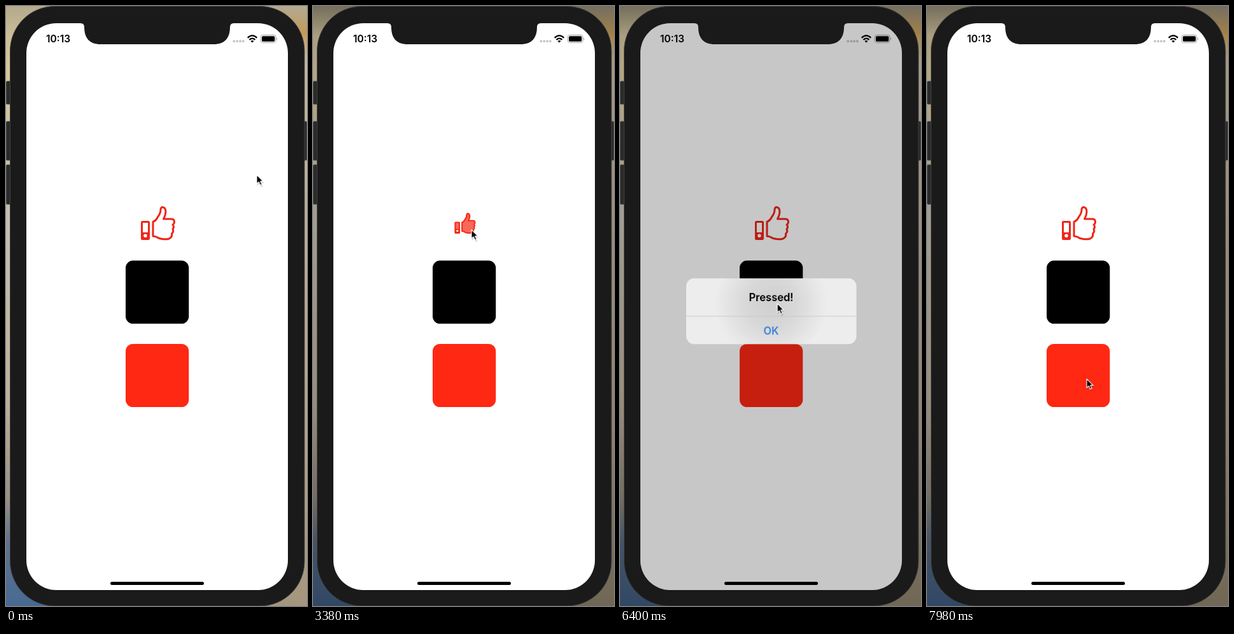
Recreate the animation shown at these times as an HTML page. Size 473 by 941 pixels, loop 8000 ms.

```html
<!DOCTYPE html>
<html lang="en">
<head>
<meta charset="utf-8">
<title>Like button</title>
<style>
html, body { margin: 0; width: 100%; height: 100%; overflow: hidden; background: #a79b87; }
svg { display: block; width: 473px; height: 941px; }
text { font-family: Inter, "Liberation Sans", sans-serif; font-weight: 600; }
.loop { animation: 8s linear infinite; }

.shade { animation-name: shade; animation-timing-function: step-end; }
@keyframes shade { 0% { opacity: .25; } 16.5%, 100% { opacity: 1; } }

.thumb { transform-origin: 239px 341px; animation-name: press; }
@keyframes press {
  0%, 17%, 23.5%, 27.59%, 34.1%, 40.5%, 47%, 52.84%, 59.34%, 100% { transform: scale(1); }
  19.25%, 29.84%, 42.75%, 55.09% { transform: scale(.5); }
  21.5%, 32.1%, 45%, 57.34% { transform: scale(1.05); }
}
.solid { animation-name: fill; }
@keyframes fill {
  0%, 17%, 31.5%, 40.5%, 56.8%, 100% { opacity: 0; }
  17.75%, 41.25% { opacity: .1; }
  19.25%, 29.84%, 42.75%, 55.09% { opacity: 1; }
}

.dim, .alert { animation-name: show; }
@keyframes show {
  0%, 75.6%, 90%, 100% { opacity: 0; }
  78.75%, 87.5% { opacity: 1; }
}
.pop { transform-origin: 237.5px 478.5px; animation-name: pop; animation-timing-function: ease-out; }
@keyframes pop {
  0%, 75.6% { transform: scale(1.18); }
  79.5%, 100% { transform: none; }
}

.cursor { animation-name: point; animation-timing-function: ease-in-out; }
@keyframes point {
  0%, 2% { transform: translate(393.5px, 264px); }
  14%, 50% { transform: translate(248.5px, 350px); }
  54%, 61% { transform: translate(247.5px, 350px); }
  70%, 78% { transform: translate(243px, 455px); }
  84%, 88.5% { transform: translate(258.5px, 501px); }
  98%, 100% { transform: translate(250.5px, 584px); }
}
</style>
</head>
<body>
<svg viewBox="0 0 473 941">
  <defs>
    <linearGradient id="wallLeft" x2="0" y2="1">
      <stop offset="0" stop-color="#c9bd9d"/>
      <stop offset=".1" stop-color="#e2d2a2"/>
      <stop offset=".35" stop-color="#cfcabd"/>
      <stop offset=".65" stop-color="#c9bda6"/>
      <stop offset=".82" stop-color="#a59c8e"/>
      <stop offset=".89" stop-color="#6b7f98"/>
      <stop offset="1" stop-color="#4f75a3"/>
    </linearGradient>
    <linearGradient id="wallRight" x2="0" y2="1">
      <stop offset="0" stop-color="#c8bda5"/>
      <stop offset=".045" stop-color="#cfa45c"/>
      <stop offset=".09" stop-color="#cfc4ac"/>
      <stop offset=".6" stop-color="#c4b49a"/>
      <stop offset="1" stop-color="#b6a68a"/>
    </linearGradient>
    <linearGradient id="shadow" x2="0" y2="1">
      <stop offset="0" stop-color="#000" stop-opacity=".42"/>
      <stop offset=".05" stop-color="#000" stop-opacity=".2"/>
      <stop offset=".7" stop-color="#000" stop-opacity=".25"/>
      <stop offset="1" stop-color="#000" stop-opacity=".38"/>
    </linearGradient>
    <radialGradient id="glass" gradientUnits="userSpaceOnUse" cx="237.5" cy="466" r="88">
      <stop offset="0" stop-color="#cfcfcf"/>
      <stop offset=".45" stop-color="#d8d8d8"/>
      <stop offset="1" stop-color="#ededed"/>
    </radialGradient>
    <clipPath id="screen"><rect x="32" y="27" width="411" height="889" rx="47"/></clipPath>
    <path id="hand" d="M231 338.5Q236 336.500 239 330Q243 325 243 319Q243.500 315.500 246 315.500
      Q251 316 251 323Q250.500 329 247.500 334H260Q264.500 334.500 264.500 338.500Q264.500 341.500 262 343
      Q265 346 262 350Q264 354 260.500 357Q261.500 362 257 364.500Q255 365.800 250 365.800
      Q241 365.500 237 362.500Q234 361 231 361Z"/>
  </defs>

  <rect width="237" height="941" fill="url(#wallLeft)"/>
  <rect x="236" width="237" height="941" fill="url(#wallRight)"/>
  <rect class="loop shade" width="473" height="941" fill="url(#shadow)"/>

  <g fill="#2a2a2a" stroke="#444" stroke-width=".8">
    <rect x="0.500" y="118" width="8" height="36" rx="1.500"/>
    <rect x="0.500" y="181" width="8" height="61" rx="1.500"/>
    <rect x="0.500" y="249" width="8" height="62" rx="1.500"/>
    <rect x="466" y="181" width="6.500" height="61" rx="1.500"/>
  </g>
  <rect x="6.500" y=".5" width="462.500" height="940.500" rx="70" fill="#1a1a1a" stroke="#414141"/>

  <g clip-path="url(#screen)">
    <rect x="32" y="27" width="411" height="889" fill="#fff"/>

    <text x="63" y="57" font-size="15.500" textLength="">10:13</text>
    <g fill="#c4c4c4">
      <rect x="356.500" y="53.500" width="3.500" height="3.500" rx="1"/>
      <rect x="361.500" y="53.500" width="3.500" height="3.500" rx="1"/>
      <rect x="366.300" y="53.500" width="3.500" height="3.500" rx="1"/>
      <rect x="371" y="53.500" width="3.500" height="3.500" rx="1"/>
    </g>
    <g fill="none" stroke="#000" stroke-width="2.300">
      <path d="M379.800 49.800Q387 43 394.200 49.800M382.500 53Q387 48.800 391.500 53"/>
      <path d="M387 57.500L384.500 55Q387 52.800 389.500 55Z" fill="#000" stroke="none"/>
    </g>
    <rect x="400.300" y="45.500" width="23.700" height="12" rx="3.300" fill="none" stroke="#a0a0a0"/>
    <rect x="402" y="47.200" width="20.300" height="8.600" rx="1.800"/>
    <path d="M425.300 49.500Q427.500 51.500 425.300 53.500Z" fill="#a0a0a0"/>

    <g class="loop thumb" fill="#fa2814">
      <g stroke="#ee2619" stroke-width="3" stroke-linejoin="round">
        <rect x="213.500" y="338.500" width="11" height="27" rx="1" fill="#fff"/>
        <use href="#hand" fill="none"/>
      </g>
      <path d="M213 355H225V366H213Z" fill="#ee2619"/>
      <circle cx="219" cy="360.300" r="2.700" fill="#fff"/>
      <g class="loop solid">
        <rect x="212" y="337" width="14" height="30" rx="2"/>
        <use href="#hand" stroke="#fa2814" stroke-width="3" stroke-linejoin="round"/>
        <circle cx="219" cy="360.300" r="2.500" fill="#fff"/>
      </g>
    </g>

    <rect x="188" y="399.300" width="99.300" height="99" rx="11.500"/>
    <rect x="188" y="530" width="99.300" height="99" rx="11.500" fill="#ff2813"/>

    <rect class="loop dim" x="32" y="27" width="411" height="889" fill="#000" fill-opacity=".22"/>
    <rect x="164" y="903" width="147" height="5" rx="2.500"/>

    <g class="loop alert">
      <g class="loop pop" text-anchor="middle" font-size="16.500">
        <rect x="104" y="427" width="267.500" height="103.300" rx="12.500" fill="url(#glass)"/>
        <path d="M104 486.500H371.500" stroke="#c6c6c8" stroke-width=".9"/>
        <text x="237.500" y="462.500">Pressed!</text>
        <text x="237.500" y="515" fill="#3a7fd8">OK</text>
      </g>
    </g>
  </g>

  <path d="M114 20V27H117Q123 27 123 33C123 50 131 60 149 60H326C344 60 352 50 352 33Q352 27 358 27H361V20Z" fill="#1a1a1a"/>

  <g class="loop cursor">
    <path d="M1 2.500V18L4.500 14.500L7 20L10 18.500L7.500 13.500H12Z" fill="#000" opacity=".18"/>
    <path d="M.5 .8V14.800L3.700 11.800L6 17L8.600 15.900L6.300 10.900H10.600Z" stroke="#fff" stroke-width="1.100" stroke-linejoin="round"/>
  </g>
</svg>
</body>
</html>
```
